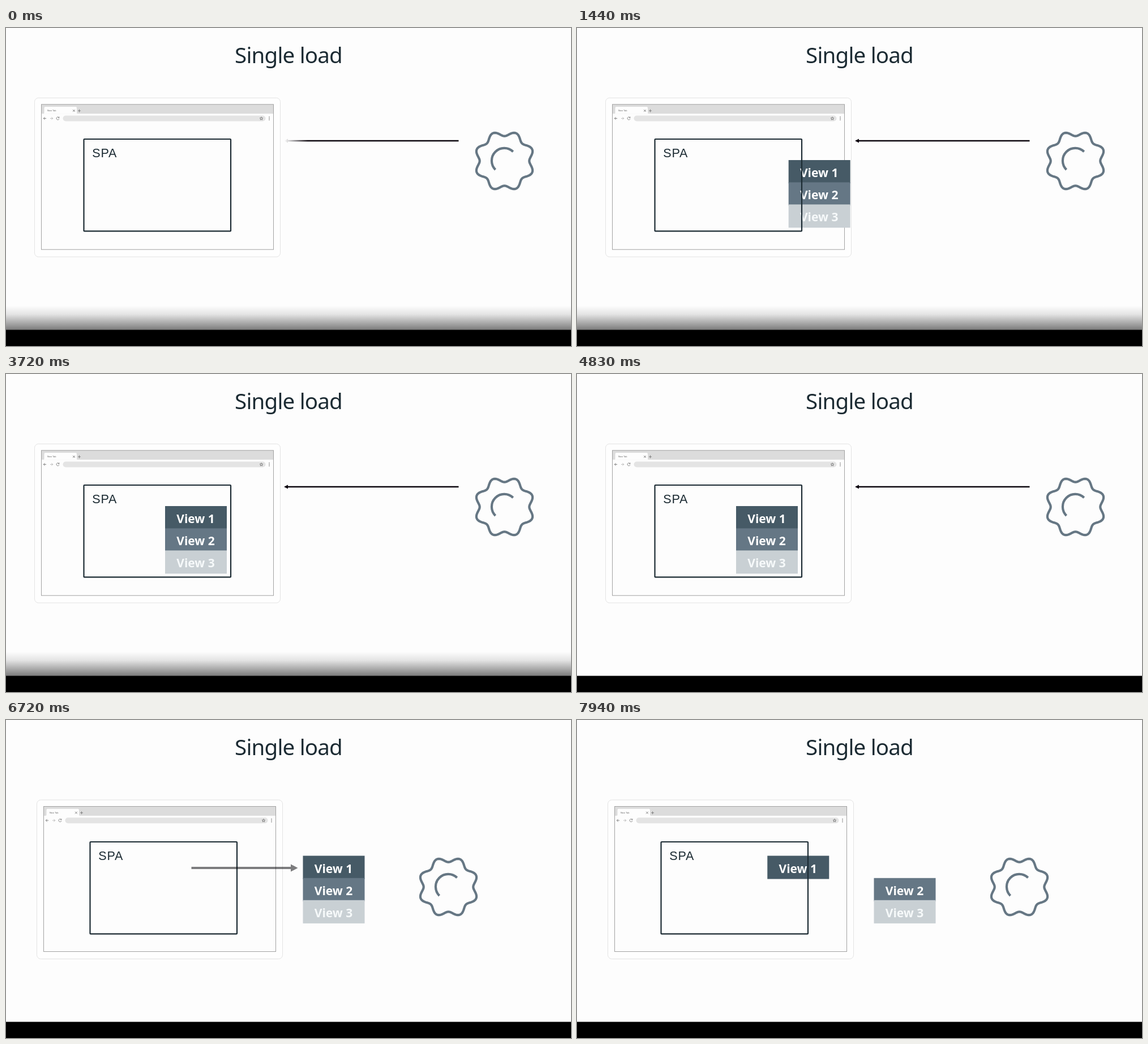
Recreate the animation shown at these times as an HTML page. Size 998 by 561 pixels, loop 8 s.

```html
<!DOCTYPE html>
<html lang="en">
<head>
<meta charset="utf-8">
<title>Single load</title>
<style>
  html, body { margin: 0; width: 100%; height: 100%; overflow: hidden; background: #fdfdfd; }
  svg { display: block; width: 998px; height: 561px; }
  .title { font: 500 38.5px "Noto Sans", sans-serif; letter-spacing: -.8px; fill: #1c2b33; }
  .spa { font: 21.5px "Liberation Sans", sans-serif; letter-spacing: .8px; fill: #1c2b33; }
  .tab { font: 4px Roboto, sans-serif; fill: #666; }
  .card text { font: 700 21px "Noto Sans", sans-serif; fill: #fff; text-anchor: middle; }
  .line { fill: none; stroke: #777; stroke-width: .9; }
</style>
</head>
<body>
<svg viewBox="0 0 998 561">
  <defs>
    <linearGradient id="wipe" gradientUnits="userSpaceOnUse" y1="0" y2="0">
      <stop stop-color="#0c060e" stop-opacity="0"/>
      <stop offset="1" stop-color="#0c060e"/>
    </linearGradient>
    <linearGradient id="shade" x2="0" y2="1">
      <stop stop-opacity="0"/>
      <stop offset=".35" stop-opacity=".1"/>
      <stop offset="1" stop-opacity=".52"/>
    </linearGradient>

    <g id="browser">
      <rect x="50.5" y="123.3" width="434" height="280.5" rx="7" fill="#fefefe" stroke="#e3e3e3"/>
      <rect x="62.5" y="134.8" width="410" height="256" fill="#fdfdfd"/>
      <rect x="62.5" y="134.8" width="410" height="16.4" fill="#dcdcdc"/>
      <path d="M66 151.2q1.5 0 1.5-2V141q0-2 2-2H123q2 0 2 2v8.2q0 2 1.5 2z" fill="#fdfdfd"/>
      <rect x="62.5" y="134.8" width="410" height="256" fill="none" stroke="#a2a2a2"/>
      <text class="tab" x="73" y="147.4">New Tab</text>
      <rect x="100.5" y="154.5" width="358" height="10" rx="5" fill="#e4e4e4"/>
      <path class="line" d="M118 144l3.8 3.8m0-3.8l-3.8 3.8M127 146h5m-2.5-2.5v5M71 159.5h-4.6m2.2-2.3l-2.3 2.3 2.3 2.3M93.6 158a2.5 2.5 0 1 0 .3 2.3m0-3.8v1.9h-2"/>
      <path class="line" opacity=".5" d="M78 159.5h4.6m-2.2-2.3l2.3 2.3-2.3 2.3"/>
      <path class="line" stroke-width=".7" d="M451 156.8l.8 1.9 2 .1-1.5 1.3.5 2-1.8-1.1-1.8 1.1.5-2-1.5-1.3 2-.1z"/>
      <path d="M465 157v0m0 2.5v0m0 2.5v0" stroke="#555" stroke-width="1.5" stroke-linecap="round"/>
    </g>
    <g id="spa">
      <rect x="137.5" y="196" width="259.5" height="162.4" rx="1" fill="none" stroke="#1c2b33" stroke-width="2.2"/>
      <text class="spa" x="152.3" y="228">SPA</text>
    </g>
    <g id="gear" fill="none" stroke="#667784" stroke-width="4.2" stroke-linejoin="round">
      <path id="rim"/>
      <path d="M15.2-16.2A22.2 22.2 0 1 0-16 15.4"/>
    </g>
    <g id="view1" class="card"><rect width="109" height="41" fill="#465a66"/><text x="54" y="30">View 1</text></g>
    <g id="view2" class="card"><rect y="39.3" width="109" height="41" fill="#657785"/><text x="54" y="69">View 2</text></g>
    <g id="view3" class="card"><rect y="78.3" width="109" height="41" fill="#c9d0d4"/><text x="54" y="108" style="fill:#f6f9fa">View 3</text></g>
  </defs>

  <rect width="998" height="561" fill="#fdfdfd"/>
  <use href="#browser"/>
  <path fill="url(#wipe)" d="M491 199l7-3.4v2.2H799.5v2.4H498v2.2z"/>
  <use href="#gear" x="880.5" y="234.5"/>
  <g id="stack"><use href="#view1"/><use href="#view2"/><use href="#view3"/></g>
  <use href="#spa"/>
  <rect id="shadow" y="490" width="998" height="43" fill="url(#shade)"/>

  <g id="second">
    <rect y="100" width="998" height="433" fill="#fdfdfd"/>
    <use href="#browser" x="4" y="17.7"/>
    <use href="#gear" x="781.5" y="294.5"/>
    <use href="#view1" id="mover" y="239.5"/>
    <use href="#view2" x="524.5" y="239.5"/>
    <use href="#view3" x="524.5" y="239.5"/>
    <use href="#spa" x="11" y="19"/>
    <path id="request" fill="#050508" d="M327.5 259H503v-4.6l12.5 6.6-12.5 6.6V263H327.5z"/>
  </g>

  <text class="title" x="499" y="62" text-anchor="middle">Single load</text>
  <rect y="532.5" width="998" height="29"/>
</svg>
<script>
  const LOOP = 8000, FPS = 18;
  const $ = id => document.getElementById(id);
  const set = (id, name, value) => $(id).setAttribute(name, value);
  const ramp = (t, start, length) => Math.min(1, Math.max(0, (t - start) / length));
  const ease = u => u < .5 ? 2 * u * u : 1 - 2 * (1 - u) ** 2;

  // Rim with eight rounded teeth
  const rim = Array.from({ length: 192 }, (_, i) => {
    const a = i * Math.PI / 96, r = 48.4 - 4.6 * Math.cos(8 * a);
    return (r * Math.cos(a)).toFixed(2) + ' ' + (r * Math.sin(a)).toFixed(2);
  });
  set('rim', 'd', 'M' + rim.join('L') + 'z');

  function draw(t) {
    const edge = 492 - 21 * ramp(t, 0, 111) * 2;
    set('wipe', 'x1', edge);
    set('wipe', 'x2', edge + 41);

    set('stack', 'opacity', t > 320 ? 1 : 0);
    set('stack', 'transform', `translate(${582 - 301 * ease(ramp(t, 530, 1505))} 233)`);
    set('shadow', 'opacity', 1 - ramp(t, 4667, 166));

    set('second', 'opacity', ramp(t, 5889, 388));
    set('request', 'opacity', 1 - ramp(t, 6500, 460));
    set('mover', 'x', 524.5 - 263 * ease(ramp(t, 7010, 1500)));
  }

  function tick() {
    const step = Math.floor(performance.now() % LOOP * FPS / 1000 + .1);
    draw(step % (LOOP * FPS / 1000) * 1000 / FPS);
    requestAnimationFrame(tick);
  }
  tick();
</script>
</body>
</html>
```
